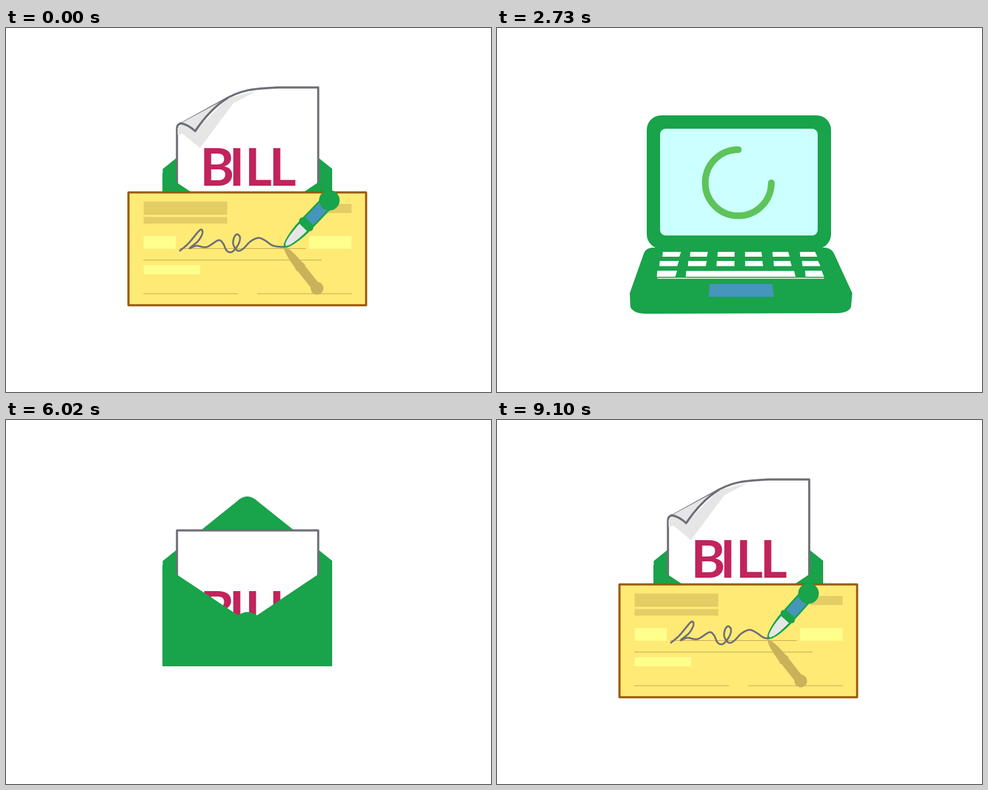
These frames come from a looping animation (800x600 px, 9170 ms). An HTML page with a canvas:

```html
<!DOCTYPE html>
<html lang="en">
<head>
<meta charset="utf-8">
<title>Paying a bill</title>
<style>
html, body { margin: 0; width: 100%; height: 100%; overflow: hidden; background: #fff; }
canvas { display: block; }
</style>
</head>
<body>
<canvas id="stage" width="800" height="600"></canvas>
<script>
const ctx = document.getElementById('stage').getContext('2d');
const LOOP = 9170, CX = 398;
const GREEN = '#19a34a', BLUE = '#4695bb', GREY = '#6d6f77', PALE = '#e6e6e6';

const lerp = (a, b, u) => a + (b - a) * u;
const span = (t, a, b) => Math.max(0, Math.min(1, (t - a) / (b - a)));
const easeIn = u => u * u;
const easeOut = u => 1 - (1 - u) ** 2;
const easeOutCubic = u => 1 - (1 - u) ** 3;
const easeInOut = u => u < .5 ? 2 * u * u : 1 - 2 * (1 - u) ** 2;
const easeSine = u => (1 - Math.cos(Math.PI * u)) / 2;
const easeBack = (u, s) => 1 + (s + 1) * (u - 1) ** 3 + s * (u - 1) ** 2;
const radians = d => d * Math.PI / 180;

function rect(color, x, y, w, h) {
  ctx.fillStyle = color;
  ctx.fillRect(x, y, w, h);
}

function roundRect(color, x, y, w, h, r) {
  ctx.fillStyle = color;
  ctx.beginPath();
  ctx.roundRect(x, y, w, h, r);
  ctx.fill();
}

function shape(color, points) {
  ctx.fillStyle = color;
  ctx.beginPath();
  points.forEach(p => ctx.lineTo(...p));
  ctx.fill();
}

function stroke(color, width) {
  ctx.strokeStyle = color;
  ctx.lineWidth = width;
  ctx.lineCap = ctx.lineJoin = 'round';
  ctx.stroke();
}

function line(color, width, ...points) {
  ctx.beginPath();
  points.forEach(p => ctx.lineTo(...p));
  stroke(color, width);
}

function group(draw) {
  ctx.save();
  draw();
  ctx.restore();
}

// Smooth curve through the handwriting's key points
const signature = (() => {
  const keys = [[287, 367], [301, 355], [320, 333], [324, 338], [317, 351], [303, 363],
    [314, 359], [331, 361], [350, 350], [358, 355], [364, 367], [373, 369], [383, 357],
    [386, 345], [381, 340], [376, 346], [375, 357], [382, 367], [391, 364], [403, 352],
    [416, 346], [427, 350], [441, 359], [459, 361]];
  const at = i => keys[Math.max(0, Math.min(keys.length - 1, i))];
  const out = [];
  for (let i = 0; i < keys.length - 1; i++) {
    for (let u = 0; u < 1; u += 1 / 16) {
      out.push([0, 1].map(k => {
        const [a, b, c, d] = [at(i - 1)[k], at(i)[k], at(i + 1)[k], at(i + 2)[k]];
        return b + u * ((c - a) + u * ((2 * a - 5 * b + 4 * c - d) + u * (3 * b - a - 3 * c + d))) / 2;
      }));
    }
  }
  out.push(keys[keys.length - 1]);
  return out;
})();

function taper(color, start, end, half) {
  ctx.fillStyle = color;
  ctx.beginPath();
  ctx.moveTo(start, 0);
  ctx.bezierCurveTo(start, -half * .6, lerp(start, end, .6), -half, end, -half);
  ctx.lineTo(end, half);
  ctx.bezierCurveTo(lerp(start, end, .6), half, start, half * .6, start, 0);
  ctx.fill();
}

function oval(color, x, y, rx, ry) {
  ctx.fillStyle = color;
  ctx.beginPath();
  ctx.ellipse(x, y, rx, ry, 0, 0, 7);
  ctx.fill();
}

function penBody(color, x, y, angle, length, thickness, detailed) {
  group(() => {
    ctx.translate(x, y);
    ctx.rotate(radians(angle));
    group(() => {
      ctx.scale(length / 152, thickness);
      taper(color, 0, 72, 12);
      rect(color, 70, -12, 82, 24);
      oval(color, 74, 0, 12, 14);
      if (detailed) {
        taper(PALE, 5, 64, 8.5);
        rect(BLUE, 84, -9, 53, 18);
      }
    });
    oval(color, length, 0, 17 * thickness, 17 * thickness);
  });
}

const pen = p => penBody(GREEN, p.x, p.y, p.angle, p.length, 1, true);

function cheque(cy, scale, written, shadow) {
  group(() => {
    ctx.translate(CX, cy);
    ctx.scale(scale, scale);
    ctx.translate(-CX, -364);
    rect('#ffea76', 202, 271, 392, 186);
    rect('#e5cd66', 227, 286, 138, 22);
    rect('#e5cd66', 227, 311.5, 138, 11);
    rect('#e5cd66', 517, 290, 53, 15);
    rect('#ffff8c', 227, 343, 53, 21);
    rect('#ffff8c', 500, 343, 70, 21);
    rect('#ffff8c', 227, 391, 93, 15);
    [[286, 494, 363.5], [227, 520, 382.5], [227, 382, 438], [415, 570, 438]]
      .forEach(([a, b, y]) => line('#c5a055', 1.2, [a, y], [b, y]));
    if (shadow) group(() => {
      ctx.beginPath();
      ctx.rect(202, 271, 392, 186);
      ctx.clip();
      penBody('#c9b25a', shadow.x, shadow.y, shadow.angle, 87, .62);
    });
    ctx.beginPath();
    ctx.rect(202, 271, 392, 186);
    stroke('#9a5a0f', 3.5);
    if (written > 0) line(GREY, 3, ...signature.slice(0, 1 + Math.round(written * (signature.length - 1))));
  });
}

function bill(top, curl) {
  group(() => {
    ctx.beginPath();
    ctx.rect(0, 0, 800, 400);
    ctx.clip();
    const at = (x, y) => [282 + x * curl, top + y * curl];
    ctx.beginPath();
    ctx.moveTo(282, 420);
    ctx.lineTo(...at(0, 67));
    ctx.quadraticCurveTo(...at(0, 60), ...at(8, 59));
    ctx.lineTo(...at(75, 22));
    ctx.bezierCurveTo(...at(106, 3), ...at(126, 2), ...at(166, 0));
    ctx.lineTo(515, top);
    ctx.lineTo(515, 420);
    const edge = () => stroke(GREY, 3.5);
    ctx.fillStyle = '#fff';
    ctx.fill();
    edge();
    if (curl > 0) {
      shape(PALE, [[1, 67], [1, 78], [9, 76], [38, 100], [93, 26], [133, 5], [83, 18], [30, 72], [8, 60]].map(p => at(...p)));
      ctx.beginPath();
      ctx.moveTo(...at(6, 59));
      ctx.quadraticCurveTo(...at(18, 61), ...at(30, 72));
      ctx.quadraticCurveTo(...at(55, 35), ...at(84, 17));
      ctx.fillStyle = PALE;
      ctx.fill();
      edge();
    }
    ctx.fillStyle = '#c1245c';
    ctx.font = 'bold 86px Lato, sans-serif';
    [...'BILL'].forEach((letter, i) => ctx.fillText(letter, [320, 368, 394, 434][i], top + 162));
  });
}

// The flap turns about its hinge, seen in strong perspective
function flap(turn) {
  const at = (x, h) => {
    const near = 1 / (1 - .72 * h / 106 * Math.sin(turn));
    return [CX + (x - CX) * near, 232 - h * Math.cos(turn) * near];
  };
  ctx.fillStyle = GREEN;
  ctx.beginPath();
  ctx.moveTo(259, 232);
  ctx.lineTo(...at(381, 98));
  ctx.quadraticCurveTo(...at(398, 114), ...at(415, 98));
  ctx.lineTo(538, 232);
  ctx.fill();
}

function envelopeFront() {
  ctx.fillStyle = GREEN;
  ctx.beginPath();
  ctx.moveTo(258, 239);
  ctx.lineTo(383, 322);
  ctx.quadraticCurveTo(398, 311, 414, 322);
  ctx.lineTo(538, 239);
  ctx.lineTo(538, 406);
  ctx.lineTo(258, 406);
  ctx.fill();
}

function envelopeScene(t) {
  const early = t < 4000;
  const turn = Math.PI * (early ? easeIn(span(t, 1510, 2100)) : 1 - easeOut(span(t, 5640, 5990)));
  if (turn > 3.14) return rect(GREEN, 258, 237, 280, 169);

  const lift = early ? 1 - easeInOut(span(t, 1150, 1600)) : easeInOut(span(t, 5850, 6200));
  const curl = early ? 1 - easeInOut(span(t, 1000, 1200)) : easeInOut(span(t, 6400, 6900));
  const inside = early && t > 520;

  rect(GREEN, 258.5, 232, 279.5, 174);
  if (turn < Math.PI / 2) flap(turn);
  bill(lerp(257, 98, lift), curl);
  if (inside) cheque(lerp(115, 332, easeIn(span(t, 520, 950))), .57, 1);
  envelopeFront();
  if (turn >= Math.PI / 2) flap(turn);
  if (early && !inside) leaveCheque(t);
  if (t > 6650) signCheque(t);
}

function leaveCheque(t) {
  const rise = easeInOut(span(t, 70, 520));
  const away = (t / 280) ** 2;
  cheque(lerp(364, 115, rise), 1 - .43 * rise + .3 * Math.sin(Math.PI * rise), 1,
    { x: 459 + 241 * away, y: 361 + 150 * away, angle: 51.5 });
  pen({ x: 459 + 241 * away, y: 361 - 233 * away, angle: -46, length: 107 });
}

function signCheque(t) {
  const offset = 359 * (1 - easeBack(span(t, 6700, 7650), 1.4));
  const written = easeSine(span(t, 8540, 9170));
  const arrive = easeOutCubic(span(t, 6975, 7675));
  const swing = easeInOut(span(t, 7280, 7680));
  let x = lerp(-120, 287, arrive), y = lerp(263, 367, arrive);
  if (written > 0) [x, y] = signature[Math.round(written * (signature.length - 1))];
  cheque(364 + offset, 1, written, { x, y: y + 2, angle: lerp(95.5, 51.5, swing) });
  pen({ x, y: y + offset, angle: lerp(-156, -48, swing), length: lerp(152, 100, swing) });
}

function laptop(open, loaded) {
  const x = lerp(255, 247, open), y = lerp(237, 144, open);
  const w = lerp(286, 304, open), h = lerp(173, 220, open);
  roundRect(GREEN, x, y, w, h, Math.max(0, 24 * open));
  if (open <= 0) return;

  group(() => {
    ctx.translate(CX, y + h / 2);
    ctx.scale(open, open);
    ctx.translate(-CX, -254);
    roundRect('#ccffff', 269, 166, 260, 176, 9);
    if (loaded > 0) {
      ctx.beginPath();
      ctx.arc(CX, 255, 54.5, -Math.PI / 2, -Math.PI / 2 - loaded * 2 * Math.PI, true);
      stroke('#5ec35b', 11);
    }
  });

  group(() => {
    ctx.translate(CX, y + h - 2);
    ctx.scale(lerp(.8, 1, open), open);
    ctx.translate(-CX, -362);
    ctx.fillStyle = GREEN;
    ctx.beginPath();
    ctx.moveTo(256, 362);
    ctx.quadraticCurveTo(245, 363, 242, 372);
    ctx.lineTo(219, 437);
    ctx.lineTo(220, 460);
    ctx.quadraticCurveTo(226, 471, 245, 471);
    ctx.lineTo(562, 470);
    ctx.quadraticCurveTo(580, 469, 584, 460);
    ctx.lineTo(586, 437);
    ctx.lineTo(556, 372);
    ctx.quadraticCurveTo(552, 363, 541, 362);
    ctx.fill();
    const key = (left, right, top, bottom) => {
      const slant = px => (px - 401) * .018;
      shape('#fff', [[left - slant(left) * -.6, top], [right + slant(right) * -.6, top],
        [right + slant(right), bottom], [left + slant(left), bottom]]);
    };
    for (let i = 0; i < 6; i++) {
      key(275 + 44.7 * i, 302.5 + 44.7 * i, 369, 377);
      key(270 + 46.4 * i, 299 + 46.4 * i, 384, 392.5);
    }
    key(266, 296, 400, 410);
    key(313, 491, 400.5, 410);
    key(507, 537, 400, 410);
    line('#fff', 1.3, [265, 412.5], [539, 412.5]);
    shape(BLUE, [[351, 422], [454, 422], [457, 443], [349, 443]]);
  });
}

function spark(t, start, [x1, y1], [x2, y2]) {
  const u = span(t, start, start + 250);
  if (u <= 0 || u >= 1) return;
  const at = k => [lerp(x1, x2, k), lerp(y1, y2, k)];
  line(GREEN, 7, at(u * u), at(easeOut(u)));
}

function laptopScene(t) {
  const open = t < 3500 ? easeBack(span(t, 2100, 2600), 1.2) : 1 - easeIn(span(t, 3960, 4400));
  laptop(open, span(t, 2380, 2847));
  spark(t, 4507, [262, 337], [183, 355]);
  spark(t, 4350, [575, 281.5], [598, 280.5]);
  spark(t, 4350, [578, 367], [601, 384.5]);
}

function frame(now) {
  const t = now % LOOP;
  rect('#fff', 0, 0, 800, 600);
  if (t >= 2100 && t < 5040) laptopScene(t);
  else envelopeScene(t);
}

const begin = performance.now();
function tick() {
  // Movement advances in 70 ms steps
  frame(Math.floor((performance.now() - begin) / 70) * 70);
  requestAnimationFrame(tick);
}
tick();
</script>
</body>
</html>
```
